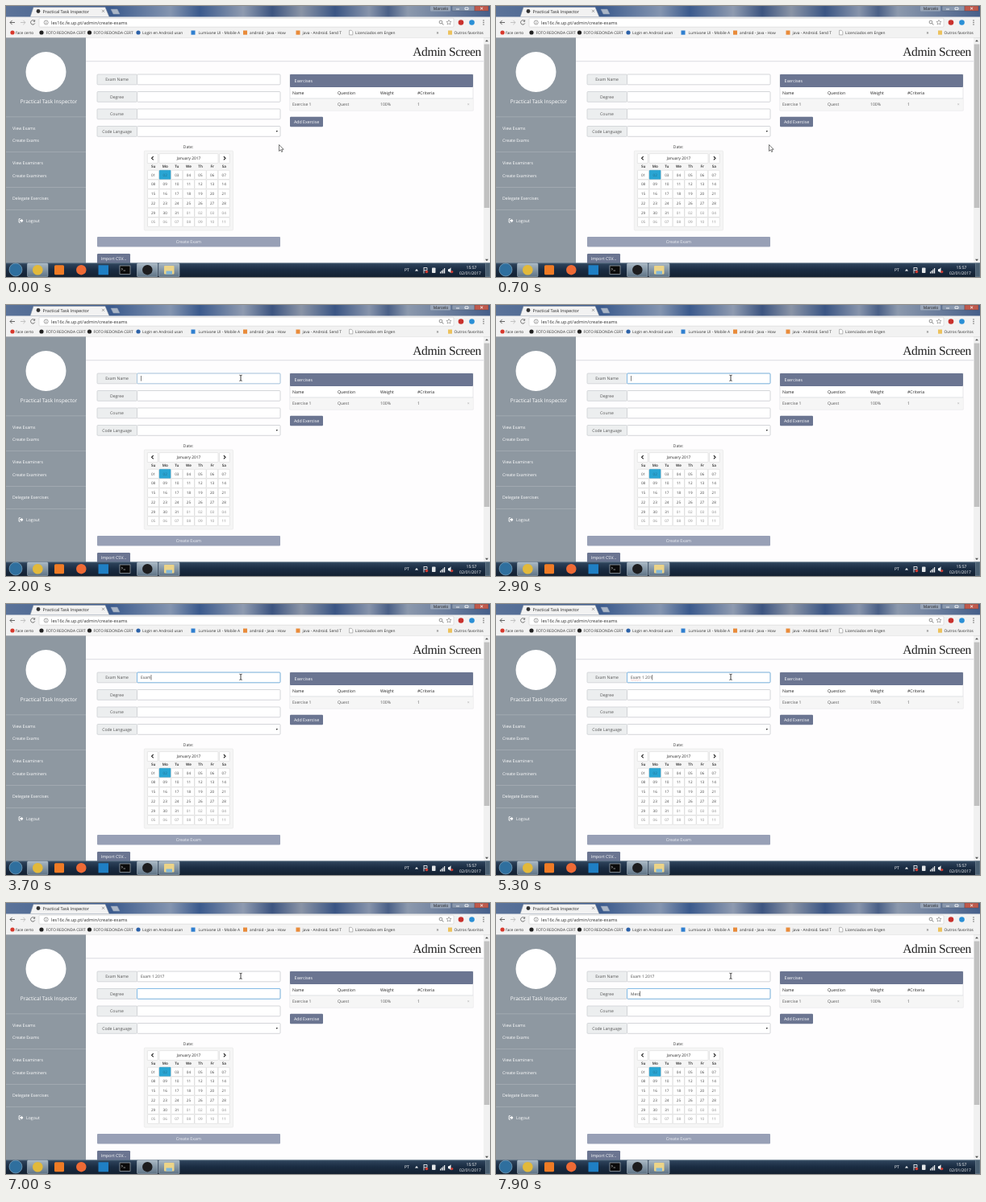
Recreate the animation shown at these times as an HTML page. Size 600 px wide and 337 px high, loop 8000 ms.

```html
<!DOCTYPE html>
<html lang="en">
<head>
<meta charset="utf-8">
<title>Create exams</title>
<style>
  html, body { margin: 0; width: 100%; height: 100%; overflow: hidden; background: #fff; }
  svg { display: block; width: 100vw; height: 100vh; }
  text { font-family: "Open Sans", "Noto Sans", sans-serif; text-rendering: geometricPrecision; white-space: pre; }
</style>
</head>
<body>
<svg id="stage" viewBox="0 0 600 337" preserveAspectRatio="none">
  <defs>
    <linearGradient id="strip">
      <stop offset="0" stop-color="#5b7399"/><stop offset=".22" stop-color="#3d5c8e"/>
      <stop offset=".34" stop-color="#8495b0"/><stop offset=".4" stop-color="#3b5a8d"/>
      <stop offset=".49" stop-color="#8f9bb0"/><stop offset=".55" stop-color="#3c5480"/>
      <stop offset=".61" stop-color="#8a94a6"/><stop offset=".68" stop-color="#3a5584"/>
      <stop offset=".75" stop-color="#8794ab"/><stop offset=".79" stop-color="#4a6087"/>
      <stop offset=".83" stop-color="#8c99ad"/><stop offset="1" stop-color="#465f8a"/>
    </linearGradient>
    <linearGradient id="bar" x2="0" y2="1">
      <stop offset="0" stop-color="#5a7083"/><stop offset=".1" stop-color="#2c4159"/>
      <stop offset=".5" stop-color="#1a2c42"/><stop offset="1" stop-color="#142131"/>
    </linearGradient>
    <linearGradient id="tile" x2="0" y2="1">
      <stop offset="0" stop-color="#a9b8c4"/><stop offset="1" stop-color="#5f7486"/>
    </linearGradient>
  </defs>
</svg>
<script>
const stage = document.getElementById('stage');
const LOOP = 8000, FRAME = 100;
const SLATE = '#6b7591', EDGE = '#c9ccd0', PAGE = '#fefdfe';

function add(tag, attrs, parent = stage) {
  const el = document.createElementNS('http://www.w3.org/2000/svg', tag);
  for (const k in attrs) el.setAttribute(k, attrs[k]);
  parent.append(el);
  return el;
}
const box = (x, y, w, h, fill, more = {}) => add('rect', { x, y, width: w, height: h, fill, ...more });
const disc = (cx, cy, r, fill, more = {}) => add('circle', { cx, cy, r, fill, ...more });
const path = (d, stroke, width = 0.6, fill = 'none') => add('path', { d, stroke, 'stroke-width': width, fill });
function text(str, x, y, { size = 5.1, fill = '#444', anchor = 'start', css = '' } = {}) {
  const el = add('text', { x, y, 'text-anchor': anchor });
  el.style.cssText = `font-size:${size}px;fill:${fill};${css}`;
  el.textContent = str;
  return el;
}
const mid = (str, x, y, opts = {}) => text(str, x, y, { anchor: 'middle', ...opts });

function drawBrowser() {
  box(0, 0, 600, 15, 'url(#strip)');
  path('M30 13.5 L34 1.5 H123 L128 13.5 Z', '#7f8a9a', 0.5, '#f2f2f2');
  disc(40, 6.5, 2.4, '#333');
  text('Practical Task Inspector', 45.5, 8.6, { size: 5.3, fill: '#222' });
  path('M119 4.8 l3 3 m0 -3 l-3 3', '#666', 0.6);
  path('M130 4 h8 l3 6 h-8 Z', '#8a99b0', 0.5, '#a9b5c6');
  box(526, 0, 25, 6.5, '#98a5b8', { rx: 1 });
  mid('Marcelo', 539, 4.9, { size: 5, fill: '#222' });
  box(553, 0, 28, 6, '#8998ae', { stroke: '#45546c', 'stroke-width': 0.4 });
  box(581, 0, 17, 6, '#c05a4c', { stroke: '#6a3a3a', 'stroke-width': 0.4 });
  path('M558 4 h4 M569 2 h4 v2.5 h-4 Z M588 1.5 l3.2 3 m0 -3 l-3.2 3', '#fff', 0.8);

  box(0, 13.5, 600, 26, '#f2f2f2');
  box(41, 15.2, 514, 11, '#fff', { rx: 1.2, stroke: '#c6c6c6', 'stroke-width': 0.5 });
  path('M11 20.5 H5 m2.6 -2.6 L5 20.5 l2.6 2.6', '#555', 0.9);
  path('M18 20.5 h6 m-2.6 -2.6 L24 20.5 l-2.6 2.6', '#bbb', 0.9);
  path('M35.5 18.8 a2.7 2.7 0 1 0 .3 2.6 M35.7 17.3 v1.9 h-1.9', '#555', 0.8);
  disc(49.7, 20.5, 2.5, 'none', { stroke: '#666', 'stroke-width': 0.6 });
  path('M49.7 20.2 v1.8 M49.7 18.8 v.6', '#666', 0.6);
  text('les16c.fe.up.pt/admin/create-exams', 56, 22.6, { size: 5.65, fill: '#333' });
  disc(539, 20, 1.9, 'none', { stroke: '#666', 'stroke-width': 0.7 });
  path('M540.4 21.4 l2 2', '#666', 0.9);
  path('M549 17.3 l.9 2 2.2 .2 -1.7 1.4 .6 2.2 -2 -1.2 -2 1.2 .6 -2.2 -1.7 -1.4 2.2 -.2 Z', '#666', 0.5);
  disc(564, 20.5, 3.3, '#c9302c');
  disc(577.5, 20.5, 3.3, '#2a8fd6');
  for (const y of [18, 20.5, 23]) disc(592, y, 0.7, '#555');

  const marks = [
    [8, 12, 'face certo', '#d8382c'], [44, 49.5, 'FOTO REDONDA CERT', '#222'],
    [103.5, 108.5, 'FOTO REDONDA CERT', '#222'], [164, 169, 'Login en Android usan', '#2d62a8'],
    [232, 238.5, 'Lumivane UI - Mobile A', '#2f7fd0', 1], [296.5, 302, 'android - Java - How', '#e98b3a', 1],
    [362, 367.5, 'java - Android. Send T', '#e98b3a', 1], [550.5, 555.5, 'Outros favoritos', '#edc25c', 1]
  ];
  for (const [ix, tx, label, color, square] of marks) {
    if (square) box(ix - 2.5, 30.5, 5, 5.2, color); else disc(ix, 33, 2.6, color);
    text(label, tx, 34.8, { size: 4.8, fill: '#333' });
  }
  path('M425.6 30.3 h2.6 l1.6 1.6 v4 h-4.2 Z', '#777', 0.5, '#fff');
  text('Licenciados em Engen', 433, 34.8, { size: 4.8, fill: '#333' });
  text('»', 533.5, 35, { size: 6, fill: '#555' });
  box(0, 39, 600, 0.6, '#c4c4c4');
}

function drawSidebar() {
  box(0, 39.5, 99, 280.5, '#8e98a1');
  disc(49.5, 82, 25, '#fff');
  mid('Practical Task Inspector', 53, 121, { size: 6.5, fill: '#fff' });
  for (const y of [137.5, 181, 225, 253]) box(0, y, 99, 0.7, '#a9b1b8');
  [['View Exams', 153.6], ['Create Exams', 169.3], ['View Examiners', 197],
   ['Create Examiners', 213], ['Delegate Exercises', 241]]
    .forEach(([s, y]) => text(s, 8, y, { size: 5.2, fill: '#fff' }));
  path('M18 264.7 h-2 v4.4 h2', '#fff', 0.8);
  path('M17.3 266 h1.7 v-1.6 l2.4 2.5 -2.4 2.5 v-1.6 h-1.7 Z', 'none', 0, '#fff');
  text('Logout', 25, 268.8, { size: 5.2, fill: '#fff' });
}

const rowY = i => 85 + i * 21.5;
const fieldBox = (i, fill, stroke) =>
  box(162.5, rowY(i), 177.5, 12.8, fill, { rx: 1, stroke, 'stroke-width': 0.8 });

function drawForm() {
  box(99, 39.5, 493, 280.5, PAGE);
  text('Admin Screen', 589, 61.5, { size: 15.6, fill: '#222', anchor: 'end',
    css: 'font-family:"Liberation Serif",serif;letter-spacing:-.4px' });
  box(99, 68, 493, 0.8, '#d9d9de');
  box(99, 68.8, 493, 1, '#f3f3f5');

  ['Exam Name', 'Degree', 'Course', 'Code Language'].forEach((label, i) => {
    box(113, rowY(i), 49.5, 12.8, '#eceeef', { rx: 1, stroke: EDGE, 'stroke-width': 0.7 });
    mid(label, 137.5, rowY(i) + 8, { fill: '#555' });
    fieldBox(i, '#fff', EDGE);
  });
  path('M334.6 155.1 h2.4 l-1.2 2 Z', 'none', 0, '#333');
  mid('Date:', 226, 177, { size: 5.2 });
  drawCalendar();

  box(113, 287, 227, 12.6, '#98a0b6', { rx: 1 });
  mid('Create Exam', 226.3, 295, { size: 5.3, fill: '#eef0f5' });
  box(113, 308, 41, 13, SLATE, { rx: 1.2 });
  mid('Import CSV...', 133.5, 316, { size: 5.3, fill: '#fff' });
}

function drawCalendar() {
  const line = { stroke: '#d0d0d0', 'stroke-width': 0.5, rx: 0.8 };
  box(171.3, 180, 110.2, 99, '#f5f5f5', { rx: 1.2, stroke: '#e1e1e1', 'stroke-width': 0.5 });
  box(175.3, 183.6, 12.8, 12, '#fff', line);
  box(190, 183.6, 73, 12, '#fff', line);
  box(264.6, 183.6, 12.6, 12, '#fff', line);
  path('M182.7 187.2 l-2.1 2.1 2.1 2.1 M269.9 187.2 l2.1 2.1 -2.1 2.1', '#222', 1.2);
  mid('January 2017', 226.5, 191, { size: 4.9, fill: '#222' });
  ['Su', 'Mo', 'Tu', 'We', 'Th', 'Fr', 'Sa'].forEach((d, c) =>
    mid(d, 182.7 + c * 14.6, 201, { size: 4.6, fill: '#222', css: 'font-weight:600' }));
  for (let i = 0; i < 42; i++) {
    const x = 175.5 + (i % 7) * 14.6, y = 204.3 + Math.floor(i / 7) * 11.75;
    const today = i === 1;
    box(x, y, 14.2, 11.3, today ? '#29a5d3' : '#fff', { ...line, stroke: today ? '#2590ba' : '#d0d0d0' });
    mid(String(i % 31 + 1).padStart(2, '0'), x + 7.1, y + 7.4,
      { size: 4.6, fill: today ? '#24708f' : i > 30 ? '#888' : '#444' });
  }
}

function drawExercises() {
  box(352, 85, 227, 45, '#fff', { stroke: '#d5d7db', 'stroke-width': 0.6 });
  box(352, 85, 227, 16, SLATE, { rx: 1 });
  text('Exercises', 357.5, 95, { size: 5.3, fill: '#fff' });
  box(352.3, 115, 226.4, 14.7, '#f6f6f6');
  box(352, 114.6, 227, 0.7, '#d5d7db');
  [['Name', 'Exercise 1', 355], ['Question', 'Quest', 411], ['Weight', '100%', 464], ['#Criteria', '1', 510]]
    .forEach(([head, cell, x]) => {
      text(head, x, 109.6, { fill: '#222', size: 5.2 });
      text(cell, x, 123.9, { fill: '#555' });
    });
  text('×', 571.8, 124.2, { fill: '#aaa' });
  box(352, 137.7, 41, 12.6, SLATE, { rx: 1.2 });
  mid('Add Exercise', 372.5, 145.8, { size: 5.3, fill: '#fff' });

  box(592, 39.6, 8, 280.4, '#f1f1f1');
  box(592.7, 47.5, 6.6, 203.5, '#c1c1c1');
  path('M594 44.3 h4 l-2 -2.4 Z M594 314.8 h4 l-2 2.4 Z', 'none', 0, '#555');
}

function drawTaskbar() {
  box(0, 319.3, 600, 17.7, 'url(#bar)');
  disc(12, 328, 8, '#2f6f9e', { stroke: '#8fb3c8', 'stroke-width': 0.6 });
  for (const x of [26.5, 162.5, 189.5])
    box(x, 320, 25.5, 16.6, 'url(#tile)', { rx: 1.2, stroke: '#b8c6d0', 'stroke-width': 0.5 });
  disc(39.3, 328.2, 6.3, '#e2b93b');
  box(60, 322.3, 12, 12, '#ef7b25', { rx: 1.5 });
  disc(93.3, 328.2, 6.2, '#ee6a35');
  box(114.5, 322.3, 12.5, 12, '#1f7fc4');
  box(141, 323, 13, 10.5, '#0a0a0a', { stroke: '#aab2b8', 'stroke-width': 0.7 });
  path('M143 326 l1.6 1.2 -1.6 1.2 M145.5 329 h2.5', '#ddd', 0.6);
  disc(175.3, 328.2, 6.2, '#1d1d1f');
  box(196, 323, 12.5, 10.5, '#ecd488', { rx: 1 });
  box(198.5, 329.5, 7.5, 4, '#80b6d8');

  text('PT', 494, 330, { size: 5.2, fill: '#fff' });
  path('M507 329.5 h4 l-2 -2.6 Z', 'none', 0, '#fff');
  path('M518 325 v7.5 M518 325.5 h4 v3.2 h-4', '#fff', 0.8);
  disc(521.5, 330.5, 1.8, '#d03b32');
  box(528, 325.5, 4.5, 6.5, '#e3e6e8', { rx: 0.8 });
  for (let i = 0; i < 4; i++) box(538 + i * 1.7, 330.5 - i * 1.5, 1.1, 2 + i * 1.5, '#fff');
  path('M548 327.3 h1.5 l2 -2 v7 l-2 -2 h-1.5 Z', 'none', 0, '#fff');
  disc(552.8, 330.6, 1.6, '#d03b32');
  mid('15:57', 577, 326.8, { fill: '#fff' });
  mid('02/01/2017', 575.5, 334, { fill: '#fff' });
  box(594.5, 319.8, 5.5, 17.2, '#4b6072', { stroke: '#8496a4', 'stroke-width': 0.5 });
}

drawBrowser();
drawSidebar();
drawForm();
drawExercises();
drawTaskbar();

// Each field: focus span and the moment every character appears.
const fields = [
  { from: 1900, to: 6300, value: 'Exam 1 2017', keys: [3100, 3300, 3400, 3600, 4100, 4300, 4700, 4900, 5000, 5200, 5500] },
  { from: 6300, to: LOOP, value: 'Mest', keys: [7200, 7400, 7600, 7800] }
];
fields.forEach((f, i) => {
  f.glow = fieldBox(i, 'none', '#6fb4ea');
  f.text = text('', 167, rowY(i) + 8, { size: 4.95 });
  f.caret = box(167, rowY(i) + 3, 0.6, 6.6, '#333');
});
const squiggle = path('M167 94.6 ' + 'q.8 -1.1 1.6 0 t1.6 0 '.repeat(4), '#e58a83', 0.4);

const arrow = path('M0 0 V8 L1.9 6.3 3.2 9 4.4 8.4 3.2 5.8 H5.6 Z', '#222', 0.6, '#fff');
const beam = path('M-1.6 -3.6 Q0 -3.6 0 -2.6 Q0 -3.6 1.6 -3.6 M0 -2.6 V2.6 M-1.6 3.6 Q0 3.6 0 2.6 Q0 3.6 1.6 3.6', '#111', 0.8);

const clamp = v => Math.min(1, Math.max(0, v));
const ease = v => v * v * (3 - 2 * v);

function showPointer(t) {
  const p = ease(clamp((t - 1000) / 800));
  const x = 338.5 - 47.5 * p, y = 172.5 - 81.7 * p;
  const overText = x < 340 && [0, 1, 2].some(i => y > rowY(i) && y < rowY(i) + 12.8);
  const at = `translate(${x} ${y})`;
  arrow.setAttribute('transform', at);
  beam.setAttribute('transform', at);
  arrow.style.display = overText ? 'none' : '';
  beam.style.display = overText ? '' : 'none';
}

function showField(f, t) {
  const focused = t >= f.from && t < f.to;
  const typed = f.keys.filter(k => k <= t);
  f.text.textContent = f.value.slice(0, typed.length);
  f.glow.style.opacity = clamp((t - f.from) / 200) * (1 - clamp((t - f.to) / 200));
  // The caret restarts its blink after every key press.
  const since = t - (typed.at(-1) ?? f.from);
  f.caret.style.display = focused && since % 1000 < 500 ? '' : 'none';
  f.caret.setAttribute('x', 167 + (typed.length ? f.text.getComputedTextLength() : 0));
}

function draw(now) {
  const t = Math.floor((now % LOOP) / FRAME) * FRAME;
  showPointer(t);
  fields.forEach(f => showField(f, t));
  squiggle.style.display = t >= 4100 && t < 6300 ? '' : 'none';
}

const start = performance.now();
function tick() {
  draw(performance.now() - start);
  requestAnimationFrame(tick);
}
tick();
</script>
</body>
</html>
```
